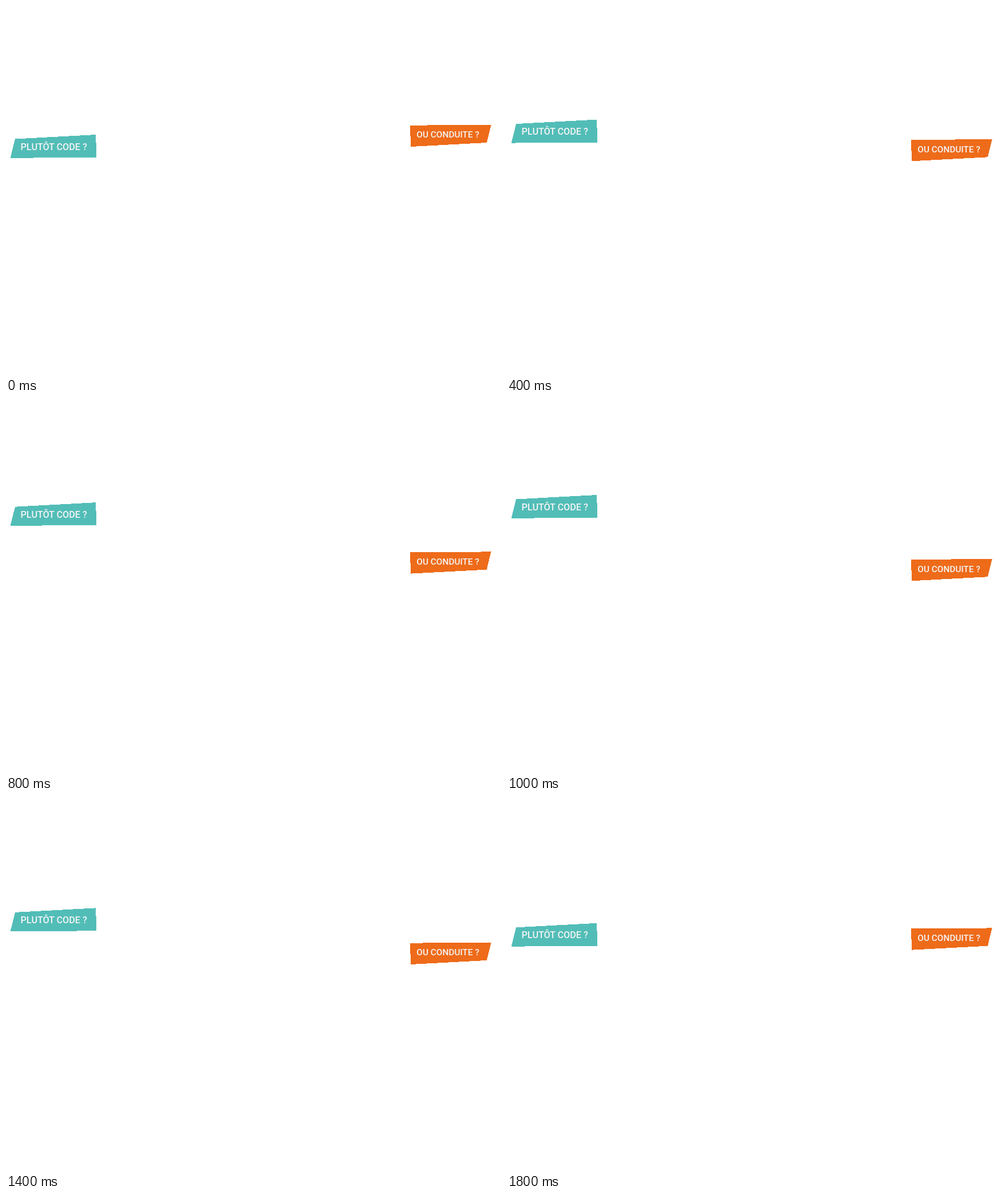
Write an HTML page that moves like this. It is 866 by 647 pixels and loops after 2000 ms.

```html
<!DOCTYPE html>
<html lang="fr">
<head>
<meta charset="utf-8">
<style>
html, body { margin: 0; width: 100%; height: 100%; overflow: hidden; background: #fff; }
svg { display: block; }
polygon { shape-rendering: crispEdges; }
text { font-family: Roboto, sans-serif; font-weight: 500; fill: #f4f4f4; }
</style>
</head>
<body>
<svg width="866" height="647" viewBox="0 0 866 647">
  <g id="code">
    <polygon fill="#52bdb7" points="16,232.5 157,225 158.4,265 64,265.3 7.5,266"/>
    <text x="25.5" y="251.7" font-size="16.2">PLUTÔT CODE ?</text>
  </g>
  <g id="drive">
    <polygon fill="#ee6b19" points="706.6,208.7 848.7,207.8 841,239 708.4,246"/>
    <text x="718.3" y="230.3" font-size="15.4">OU CONDUITE ?</text>
  </g>
</svg>
<script>
const STEP = 200, STEPS = 10;
const code = document.getElementById("code");
const drive = document.getElementById("drive");
const shift = (el, y) => el.setAttribute("transform", `translate(0 ${y})`);

function draw(now) {
  const step = Math.floor(now / STEP) % STEPS;
  const level = Math.min(step, STEPS - step);
  shift(code, -13.2 * level);
  shift(drive, 12.65 * level);
  requestAnimationFrame(draw);
}
draw(performance.now());
</script>
</body>
</html>
```
